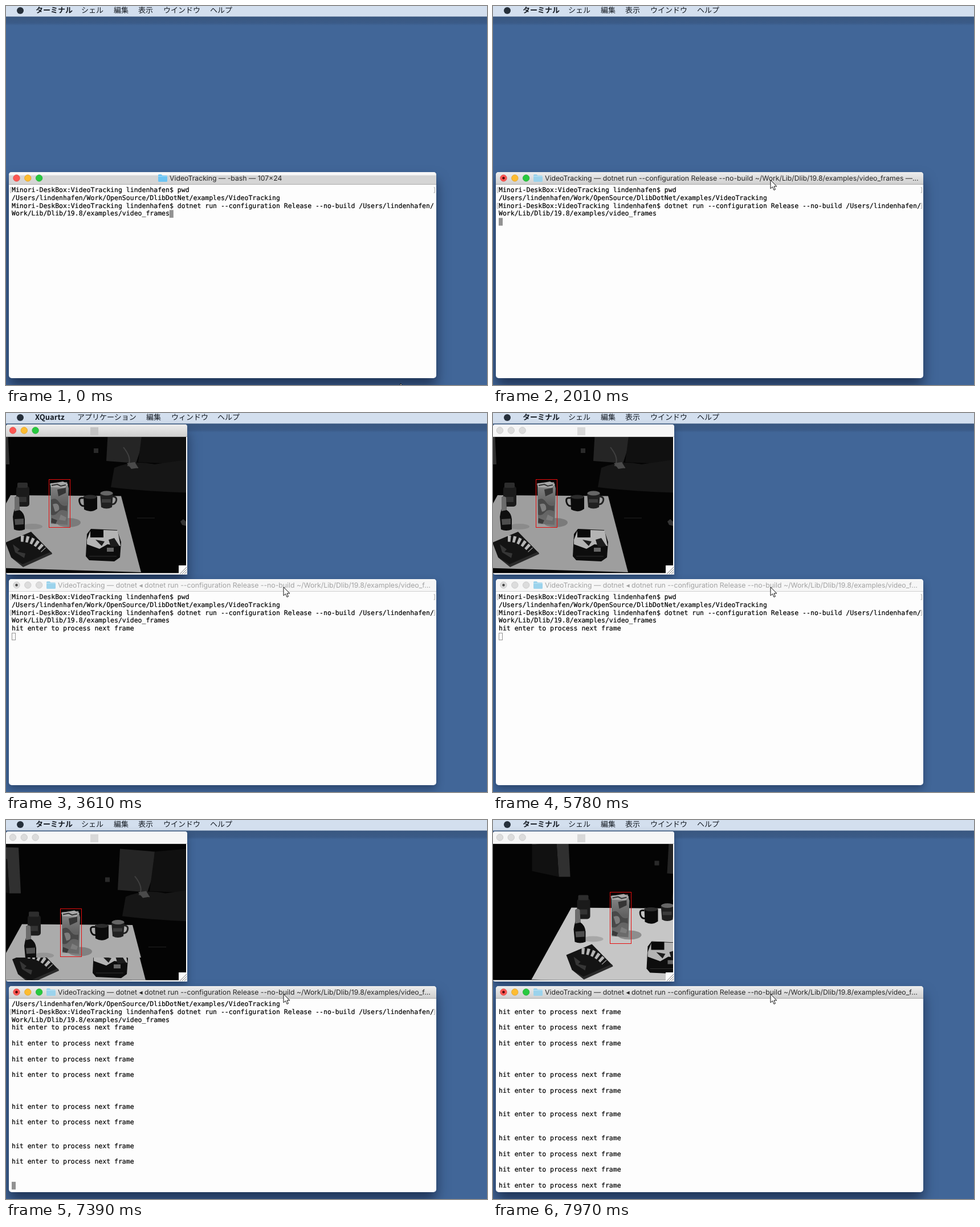
Recreate the animation shown at these times as an HTML page. Size 844 by 664 pixels, loop 8000 ms.

```html
<!DOCTYPE html>
<html lang="ja">
<head>
<meta charset="utf-8">
<title>Video tracking session</title>
<style>
html, body { margin: 0; width: 100%; height: 100%; overflow: hidden; background: #416698; }
svg { display: block; width: 844px; height: 664px; }
text { text-rendering: geometricPrecision; }
.menu { font: 13px "Noto Sans CJK JP", "Noto Sans CJK", sans-serif; fill: #141a22; }
.menu .app { font-weight: 700; }
.title { font: 12.26px Inter, "DejaVu Sans", sans-serif; }
.term { font: 11.5px "DejaVu Sans Mono", monospace; fill: #000; }
.term text { stroke: #000; stroke-width: .2px; }
.front { filter: drop-shadow(0 14px 11px rgba(8, 18, 40, .58)); }
.back { filter: drop-shadow(0 6px 7px rgba(8, 18, 40, .4)); }
</style>
</head>
<body>
<svg viewBox="0 0 844 664" xmlns="http://www.w3.org/2000/svg">
  <defs>
    <linearGradient id="bar" x2="0" y2="1">
      <stop stop-color="#ededed"/><stop offset="1" stop-color="#cecece"/>
    </linearGradient>
    <linearGradient id="strip" x2="0" y2="1">
      <stop stop-color="#39577f"/><stop offset=".75" stop-color="#3b5b88"/><stop offset="1" stop-color="#416698"/>
    </linearGradient>
    <linearGradient id="carton" x2="0" y2="1">
      <stop stop-color="#8a8a8a"/><stop offset=".5" stop-color="#606060"/><stop offset="1" stop-color="#6c6c6c"/>
    </linearGradient>
    <clipPath id="screen"><path d="M0 42H316V280.500H0z"/></clipPath>
    <clipPath id="torn"><path d="M0 241H317V281H0z"/></clipPath>
    <g id="scene">
      <!-- room -->
      <path d="M-500-300H800V600H-500z" fill="#040404"/>
      <path d="M-61 8L2 10L6 90H-14L-18 30L-61 34z" fill="#303030"/>
      <path d="M-61 34L-18 30L-14 90L-61 80z" fill="#111"/>
      <path d="M180 12L241 17L238 58L228 88L176 84z" fill="#252525"/>
      <path d="M241 17L317 10V90L232 86z" fill="#101010"/>
      <path d="M190 96Q225 82 260 90L330 80V140Q250 138 184 130z" fill="#161616"/>
      <path d="M206 60Q222 80 214 92L232 96" fill="none" stroke="#404040" stroke-width="2"/>
      <path d="M212 88L226 86L232 96L220 98z" fill="#4a4a4a"/>
      <path d="M154 62h8v8h-8z" fill="#2a2a2a"/>
      <path d="M230 184H261" stroke="#222"/>
      <path d="M306 190l5-4l6 5v7l-8-2z" fill="#353535"/>
      <!-- table -->
      <path id="table" d="M8 144L202 145.500L237 279L-62 270z"/>
      <ellipse cx="110" cy="192" rx="21" ry="8" fill="#606060" opacity=".55"/>
      <ellipse cx="46" cy="199" rx="18" ry="5" fill="#606060" opacity=".3"/>
      <!-- jar and bottle -->
      <rect x="18" y="128" width="23" height="36" rx="5" fill="#1b1b1b"/>
      <rect x="20" y="122" width="18" height="9" rx="2" fill="#2d2d2d"/>
      <path d="M21 147h15v9H21z" fill="#333"/>
      <path d="M15 148Q19 144 23 148L24 170Q32 175 33 186V204Q23 208 14 204L12 182Q13 174 15 168z" fill="#0e0e0e"/>
      <path d="M15 148Q19 144 23 148L24 170L15 172z" fill="#6c6c6c"/>
      <path d="M15 186l16-1v10l-15 1z" fill="#4d4d4d"/>
      <!-- juice carton -->
      <path d="M78 123L107 121L110 132L108 196L79 194z" fill="url(#carton)"/>
      <path d="M77 124L100 120L109 125L103 131L79 130z" fill="#a8a8a8"/>
      <path d="M80 127l10-2l6 3l9-2" fill="none" stroke="#333" stroke-width="2"/>
      <path d="M90 134l15-3v9l-13 6z" fill="#353535"/>
      <path d="M79 152q8-5 14 4t14 6v10q-10-5-16 2t-12 4z" fill="#484848"/>
      <path d="M82 160q9-4 11 4t-7 9zM96 178l10 5l-2 6l-11-2z" fill="#7d7d7d"/>
      <path d="M80 184l10 4l-3 6l-8-2z" fill="#3a3a3a"/>
      <!-- mugs -->
      <path d="M136 149Q127 147 129 156Q131 164 138 163" fill="none" stroke="#111" stroke-width="3"/>
      <path d="M136 146Q148 142 160 146V168Q149 176 137 169z" fill="#0b0b0b"/>
      <ellipse cx="148" cy="147" rx="11.500" ry="3.500" fill="#2c2c2c"/>
      <path d="M187 146Q196 147 193 155Q191 160 186 160" fill="none" stroke="#222" stroke-width="3"/>
      <path d="M165 140H188L186 165Q176 170 167 165z" fill="#202020"/>
      <ellipse cx="176.500" cy="140.500" rx="11" ry="4" fill="#666"/>
      <path d="M168 151h16v6h-16z" fill="#3c3c3c"/>
      <!-- snack packs -->
      <path d="M-1 227L44 208L81 246L29 268L9 253z" fill="#141414"/>
      <path d="M9 253L29 265L79 243L81 247L30 270z" fill="#2a2a2a"/>
      <path d="M26 220Q48 220 66 240" fill="none" stroke="#b4b4b4" stroke-width="11" stroke-dasharray="5 4"/>
      <path d="M12 230l12 9l-4 4l14 3l-2 8l-16-10z" fill="#363636"/>
      <path d="M142 212L149 203L195 205L202 226L200 253L190 260L146 258L140 251z" fill="#0d0d0d"/>
      <path d="M142 222L149 204L196 206L201 233L178 230L164 238L142 230z" fill="#b4b4b4"/>
      <path d="M148 204h23v14h-23z" fill="#090909"/>
      <path d="M157 222l16 3l-5 8zM180 222l10-3l9 14l-15 2z" fill="#1c1c1c"/>
      <path d="M177 236h12v7h-12z" fill="#666"/>
      <path d="M146 251h48" stroke="#303030"/>
    </g>
  </defs>

  <path d="M0 0H844V664H0z" fill="#416698"/>
  <path d="M0 18H844V34H0z" fill="url(#strip)"/>
  <path d="M0 0H844V18.500H0z" fill="#d3dfee"/>
  <circle cx="25" cy="8" r="6" fill="#26303b"/>
  <g id="menu" class="menu"></g>

  <g id="viewer">
    <rect id="viewerBody" y="20" width="318" height="263" rx="4" fill="#fdfdfd"/>
    <g id="viewerBar"></g>
    <g id="picture" clip-path="url(#screen)">
      <use id="view" href="#scene"/>
      <g id="tear" clip-path="url(#torn)"><use href="#scene" x="12" y="17"/></g>
      <rect id="box" width="37" fill="none" stroke="#e80c0c"/>
    </g>
    <path d="M303 267H318V283H303z" fill="#fdfdfd"/>
    <path d="M305 282L317 270M309 282L317 274M313 282L317 278" stroke="#777"/>
  </g>

  <rect id="termBody" x="5" y="291" width="750" height="361" rx="5" fill="#fdfdfd"/>
  <g id="termBar"></g>
  <g id="term" class="term"></g>
  <path id="ghost" d="M692 661v3h2.500z" fill="#fff"/>
  <path id="mouse" d="M0 0V15L3.500 11.800L6 17.500L8.400 16.500L6 11H10.800z" fill="#fff" stroke="#111"/>
</svg>
<script>
const LOOP = 8000;
const $ = id => document.getElementById(id);
const lerp = (a, b, p) => a + (b - a) * p;
const clamp = x => Math.max(0, Math.min(1, x));

const HOST = 'Minori-DeskBox:VideoTracking lindenhafen$ ';
const FIXED = [
  HOST + 'pwd',
  '/Users/lindenhafen/Work/OpenSource/DlibDotNet/examples/VideoTracking',
  HOST + 'dotnet run --configuration Release --no-build /Users/lindenhafen/',
  'Work/Lib/Dlib/19.8/examples/video_frames'
];
// terminal rows that hold the prompt, counted from the first line
const PROMPTS = [4, 6, 8, 10, 14, 16, 19, 21, 25, 27, 31, 33, 35, 39, 41, 44, 47, 49, 51, 53];
const CURSOR_ROWS = [[0, 3], [2010, 4], [3470, 5], [6860, 7], [7170, 8], [7310, 13], [7390, 24], [7450, 26],
  [7520, 28], [7590, 29], [7670, 30], [7750, 37], [7820, 42], [7900, 48], [7970, 53]];
const PANS = [[0, 0, 0], [6860, 3, 4], [7310, 9, 18], [7390, 20, 38.5], [7450, 28, 46], [7520, 40, 51], [7590, 50, 52],
  [7670, 61, 48.5], [7750, 78, 38], [7820, 95, 28], [7900, 113, 18], [7970, 129.500, 9.500]];
const MENUS = {
  terminal: [[52, 'ターミナル'], [132, 'シェル'], [189, '編集'], [232, '表示'], [276, 'ウインドウ'], [358, 'ヘルプ']],
  viewer: [[51, 'XQuartz'], [125, 'アプリケーション'], [246, '編集'], [290, 'ウィンドウ'], [371, 'ヘルプ']]
};

const at = (keys, t) => keys.filter(k => k[0] <= t).pop();
const text = (x, y, s, attrs = '') => `<text x="${x}" y="${y}" ${attrs}>${s}</text>`;
const cache = {};
function fill(id, html) {
  if (cache[id] !== html) $(id).innerHTML = cache[id] = html;
}

const menu = items => items.map(([x, s], i) => text(x, 12, s, i ? '' : 'class="app"')).join('');

function lights(x, y, active, dot) {
  const colors = active ? ['#fc5753', '#fdbc31', '#28c940'] : ['#dcdcdc', '#dcdcdc', '#dcdcdc'];
  const edges = active ? ['#e0443e', '#dfa023', '#1dad2b'] : ['#c4c4c4', '#c4c4c4', '#c4c4c4'];
  return colors.map((c, i) =>
    `<circle cx="${x + i * 19.800}" cy="${y}" r="5.700" fill="${c}" stroke="${edges[i]}" stroke-width=".8"/>`).join('') +
    (dot ? `<circle cx="${x}" cy="${y}" r="2.200" fill="${active ? '#4d0000' : '#444'}"/>` : '');
}

function bar(x, y, w, active) {
  return `<path d="M${x} ${y + 22}v-17q0-5 5-5h${w - 10}q5 0 5 5v17z" fill="${active ? 'url(#bar)' : '#f6f6f6'}"/>` +
    `<path d="M${x} ${y + 21.500}h${w}" stroke="${active ? '#aaa' : '#d0d0d0'}"/>`;
}

const folder = (x, color) =>
  `<path d="M${x} 296.500q0-1.500 1.500-1.500h4l2 2h7q1.500 0 1.500 1.500v8q0 1.500-1.500 1.500h-13q-1.500 0-1.500-1.500z" fill="${color}"/>` +
  `<path d="M${x} 298.500h16" stroke="#fff" stroke-opacity=".35"/>`;

function termBar(t, active) {
  const args = 'dotnet run --configuration Release --no-build ~/Work/Lib/Dlib/19.8/examples/';
  const idle = t < 2010;
  const name = idle ? '-bash — 107×24'
    : t < 3310 ? args + 'video_frames —…' : 'dotnet ◂ ' + args + 'video_f…';
  const x = idle ? 287 : 91;
  return bar(5, 291, 750, active) +
    (idle ? '<path d="M5 296.500H755V312H5z" fill="#d5d5d5"/><path d="M7 293.500q1-2.500 4-2.500H749q4 0 5 5.500H6z" fill="#f7f7f7"/>' : '') +
    lights(18.500, 301.500, active, !idle) +
    folder(x - 20, idle ? '#6cc5f4' : '#9bd3ec') +
    text(x, 306, 'VideoTracking — ' + name, `class="title" fill="${active ? '#262626' : '#a2a2a2'}"`);
}

function terminal(t, active) {
  const cursor = at(CURSOR_ROWS, t)[1];
  const first = Math.max(0, cursor - 23);
  const top = row => 316 + (row - first) * 13.820;
  const line = (row, s) => row < first ? '' : text(10, Math.round(top(row) + 10), s);
  const marks = row => row < first ? '' :
    `<path d="M9.500 ${top(row) + 2}h-2v9h2M750.500 ${top(row) + 2}h2v9h-2" fill="none" stroke="#a8a8a8"/>`;
  const full = t >= 7970;
  const x = t < 2010 ? 286.800 : 10;
  const caret = full ? '' : active
    ? `<rect x="${x}" y="${top(cursor)}" width="7" height="13.500" fill="#929292"/>`
    : `<rect x="${x + .5}" y="${top(cursor) + .5}" width="6" height="12" fill="none" stroke="#929292"/>`;
  return marks(0) + (t < 2010 ? '' : marks(2)) + FIXED.map((s, row) => line(row, s)).join('') +
    PROMPTS.filter(row => row < cursor || full).map(row => line(row, 'hit enter to process next frame')).join('') + caret;
}

function picture(t) {
  const [time, dx, dy] = at(PANS, t);
  const gray = Math.round(lerp(158, 198, clamp(dx / 60)));
  $('table').setAttribute('fill', `rgb(${gray},${gray},${gray})`);
  $('view').setAttribute('transform', `translate(${dx} ${dy})`);
  $('tear').setAttribute('display', time === 7390 ? 'inline' : 'none');
  $('box').setAttribute('x', Math.round(75 + dx) + .5);
  $('box').setAttribute('y', Math.round(116 + dy) + .5);
  $('box').setAttribute('height', Math.round(lerp(84, 90, clamp((dx - 61) / 68))));
}

function mouse(t) {
  const step = t < 60 ? 0 : Math.min(11, Math.floor((t - 60) / 63) + 1);
  const p = 1 - (1 - step / 11) ** 1.500;
  const curve = (a, b, c) => lerp(lerp(a, b, p), lerp(b, c, p), p);
  $('mouse').setAttribute('transform', `translate(${curve(692, 850, 487)} ${curve(661, 480, 305)})`);
  $('ghost').setAttribute('display', t < 920 ? 'inline' : 'none');
}

function draw(t) {
  const termActive = t < 3310 || t >= 6010;
  const viewerActive = t < 5780;
  fill('menu', menu(t >= 3260 && t < 5780 ? MENUS.viewer : MENUS.terminal));
  fill('termBar', termBar(t, termActive));
  fill('term', terminal(t, termActive));
  $('termBody').setAttribute('class', termActive ? 'front' : 'back');

  $('viewer').setAttribute('display', t < 3470 ? 'none' : 'inline');
  $('viewerBody').setAttribute('class', viewerActive ? 'front' : 'back');
  fill('viewerBar', bar(0, 20, 318, viewerActive) + lights(12, 30.500, viewerActive) +
    `<rect x="148" y="25" width="14" height="14" fill="${viewerActive ? '#c4c4c4' : '#d9d9d9'}"/>`);
  $('picture').setAttribute('display', t < 3610 ? 'none' : 'inline');
  picture(t);
  mouse(t);
}

const start = performance.now();
function tick(now) {
  draw(Math.max(0, now - start) % LOOP);
  requestAnimationFrame(tick);
}
draw(0);
requestAnimationFrame(tick);
</script>
</body>
</html>
```
